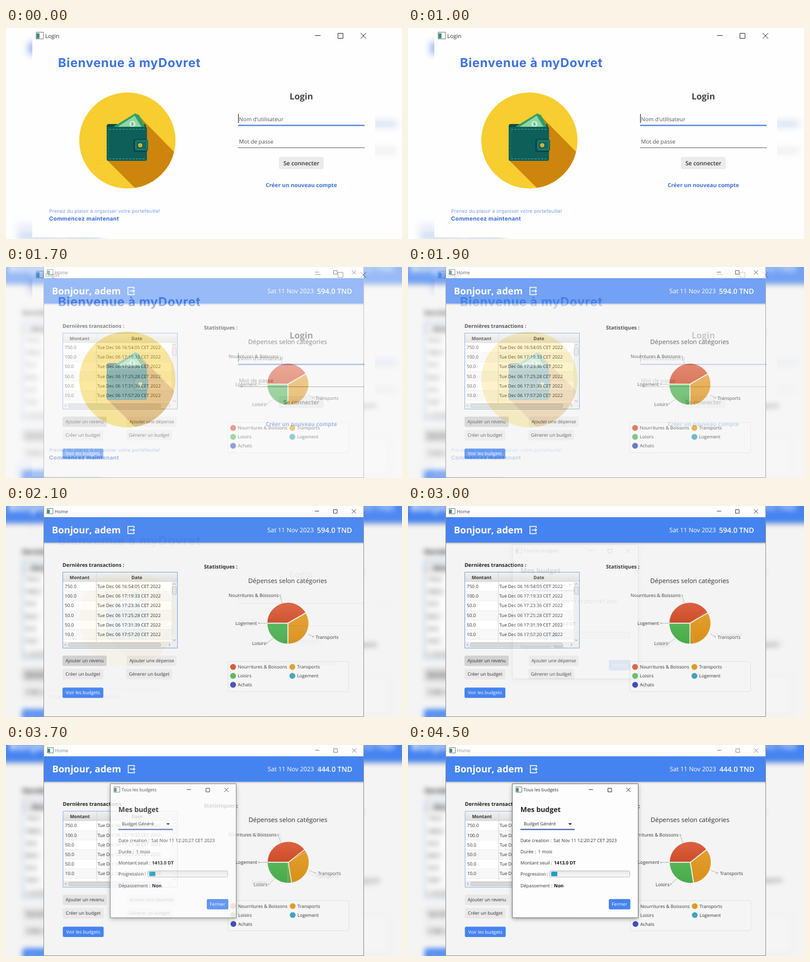
Animation, 708 px wide and 378 px high, one loop 5.2 s. Source, as an HTML page with a canvas:

```html
<!DOCTYPE html>
<html lang="fr">
<head>
<meta charset="utf-8">
<title>Portefeuille</title>
<style>
html, body { margin: 0; width: 100%; height: 100%; overflow: hidden; background: #fff; }
canvas { display: block; width: 708px; height: 378px; }
</style>
</head>
<body>
<canvas id="stage" width="708" height="378"></canvas>
<script>
const W = 708, H = 378, LOOP = 5200, STEP = 100;
const UI = '"Open Sans", "Noto Sans", sans-serif';
const DISPLAY = 'Inter, "Open Sans", sans-serif';
const BLUE = '#4583f0', PAGE = '#f4f4f4', INK = '#333';
const stage = document.getElementById('stage').getContext('2d');
let c;

function layer(paint) {
  const canvas = document.createElement('canvas');
  canvas.width = W;
  canvas.height = H;
  c = canvas.getContext('2d');
  c.textRendering = 'geometricPrecision';
  paint();
  return canvas;
}

// y is the middle of the capitals
function text(s, x, y, size, { color = INK, weight = 400, align = 'left', font = UI, spacing = 0 } = {}) {
  c.font = `${weight} ${size}px ${font}`;
  c.letterSpacing = spacing + 'px';
  c.textAlign = align;
  c.fillStyle = color;
  c.fillText(s, x, y + size * 0.36);
}

function box(x, y, w, h, fill, radius = 0, border) {
  c.beginPath();
  c.roundRect(x, y, w, h, radius);
  if (fill) { c.fillStyle = fill; c.fill(); }
  if (border) { c.strokeStyle = border; c.lineWidth = 1; c.stroke(); }
}

function disc(x, y, r, fill) {
  c.beginPath();
  c.arc(x, y, r, 0, Math.PI * 2);
  c.fillStyle = fill;
  c.fill();
}

function path(points, { fill, stroke, width = 1, dash = [] }) {
  c.beginPath();
  points.forEach(([x, y]) => c.lineTo(x, y));
  if (fill) { c.fillStyle = fill; c.fill(); }
  if (stroke) {
    c.strokeStyle = stroke;
    c.lineWidth = width;
    c.setLineDash(dash);
    c.stroke();
    c.setLineDash([]);
  }
}

function verticalFade(y0, y1, from, to) {
  const g = c.createLinearGradient(0, y0, 0, y1);
  g.addColorStop(0, from);
  g.addColorStop(1, to);
  return g;
}

function titleBar(title, x, y, size, buttons, s, color = INK) {
  box(x + 0.5, y - s / 2 - 0.5, s + 1, s, '#fff', 0, '#777');
  box(x + 1, y - s / 2 + 1.5, s * 0.45, s - 3, '#3b8a80');
  text(title, x + s + 4.5, y, size, { color });
  const [min, max, close] = buttons, h = s / 2 - 1, ink = { stroke: color };
  path([[min - h, y - 0.5], [min + h, y - 0.5]], ink);
  box(Math.round(max - h) + 0.5, Math.round(y - h) + 0.5, 2 * h - 1, 2 * h - 1, null, 0, color);
  path([[close - h, y - h], [close + h, y + h]], ink);
  path([[close - h, y + h], [close + h, y - h]], ink);
}

function wallet() {
  c.save();
  c.beginPath();
  c.arc(217, 201.5, 86, 0, Math.PI * 2);
  c.clip();
  c.fillStyle = '#f7cd2f';
  c.fillRect(130, 114, 175, 175);
  path([[181, 237], [245, 301], [330, 301], [330, 252], [235, 155]], { fill: '#cd850d' });
  c.restore();

  box(180, 172, 70, 12, '#0a4a48', 4);
  path([[190, 178], [231, 153], [238, 156], [250, 180]], { fill: '#2f9f68' });
  path([[198, 178], [230, 157], [244, 180]], { fill: '#8fd5a3' });
  disc(226, 172, 5.5, '#c9efcf');
  text('$', 226, 172, 8, { color: '#2f9f68', weight: 700, align: 'center' });
  box(180, 177, 72, 61, '#0d5f59', 3);
  const stitch = { stroke: '#4ba292', dash: [4, 2] };
  path([[184, 181.5], [249, 181.5]], stitch);
  path([[184, 234.5], [249, 234.5]], stitch);
  path([[183.5, 183], [183.5, 233]], { stroke: '#27776f', dash: [4, 2] });
  box(228, 199, 25, 23, '#083f3f', 4);
  box(230, 200, 24, 20, '#11685f', 3);
  box(232.5, 202.5, 19, 15, null, 2, '#348a7d');
  disc(240, 210, 3.6, '#f2c12e');
  disc(240, 210, 1.5, '#c98a10');
}

function login() {
  c.fillStyle = '#fefefe';
  c.fillRect(0, 0, W, H);
  titleBar('Login', 53.5, 14, 10, [557.5, 597.5, 639], 12);
  text('Bienvenue à myDovret', 93, 62.5, 22, { color: '#3d70e2', weight: 700, font: DISPLAY, spacing: 0.7 });
  wallet();
  text('Prenez du plaisir à organiser votre portefeuille!', 77, 328, 8.7,
    { color: '#7f9be0', font: DISPLAY, spacing: 0.15 });
  text('Commencez maintenant', 77, 341.5, 10, { color: '#3b69d4', weight: 700, font: DISPLAY, spacing: 0.3 });

  text('Login', 528, 122.5, 15.5, { color: '#444', weight: 700, align: 'center' });
  c.fillStyle = '#222';
  c.fillRect(415, 154, 1, 16);
  text("Nom d'utilisateur", 416.5, 163, 9.9, { color: '#555' });
  c.fillStyle = '#3f73d6';
  c.fillRect(415, 173.5, 226, 2);
  text('Mot de passe', 416.5, 203, 9.9, { color: '#555' });
  c.fillStyle = '#666';
  c.fillRect(415, 214, 226, 1);
  box(488, 231, 80, 22, '#ebebeb', 3);
  text('Se connecter', 528, 242, 10.3, { weight: 600, align: 'center' });
  text('Créer un nouveau compte', 528, 281.5, 9.9, { color: '#3d70d8', weight: 700, align: 'center' });
}

function table() {
  const amounts = ['750.0', '100.0', '50.0', '50.0', '50.0', '10.0'];
  const times = ['16:54:05', '17:19:33', '17:23:36', '17:25:28', '17:31:39', '17:57:20'];
  box(101.5, 118.5, 205, 136, '#fff', 0, '#78a2dc');
  box(102, 119, 204, 17, verticalFade(119, 136, '#f1f1f1', '#dcdcdc'));
  text('Montant', 131.5, 128, 8.2, { weight: 700, align: 'center' });
  text('Date', 234, 128, 8.2, { weight: 700, align: 'center' });
  amounts.forEach((amount, i) => {
    const y = 144.2 + i * 17.15;
    box(102, y - 8, 194, 17, i % 2 ? '#f8f8f8' : '#fff');
    path([[102, y + 8.8], [296, y + 8.8]], { stroke: '#ececec' });
    text(amount, 105, y, 8.2);
    text(`Tue Dec 06 ${times[i]} CET 2022`, 163, y, 8.2);
  });
  path([[161.5, 119], [161.5, 243]], { stroke: '#d6d6d6' });
  box(296, 136, 10, 107, '#ededed');
  box(102, 243, 204, 11, '#ededed');
  box(297.5, 144.5, 7, 14, '#e2e2e2', 2, '#bbb');
  box(111.5, 245.5, 165, 6, '#d8d8d8', 2, '#bbb');
  const arrow = { stroke: '#888' };
  path([[298.5, 141], [301, 138.5], [303.5, 141]], arrow);
  path([[298.5, 239], [301, 241.5], [303.5, 239]], arrow);
  path([[107.5, 246], [105, 248.5], [107.5, 251]], arrow);
  path([[291, 246], [293.5, 248.5], [291, 251]], arrow);
}

function pie(cuts, labels) {
  const x = 504, y = 210, r = 37.5, rad = Math.PI / 180;
  const [upper, lower] = cuts;
  const slices = [
    [180, 360 + upper, '#dd6141', '#b93712'],
    [upper, lower, '#e7a234', '#d98f18'],
    [lower, 180, '#62c565', '#48a94b']
  ];
  slices.forEach(([from, to, light, dark]) => {
    c.beginPath();
    c.moveTo(x, y);
    c.arc(x, y, r, from * rad, to * rad);
    c.closePath();
    c.fillStyle = verticalFade(y - r, y + r, light, dark);
    c.fill();
    c.strokeStyle = PAGE;
    c.lineWidth = 1.6;
    c.stroke();
  });
  labels.forEach(([name, tx, ty, x0, y0, x1, y1]) => {
    path([[x0, y0], [x1, y1]], { stroke: '#b5b5b5' });
    disc(x0, y0, 1.6, '#bbb');
    text(name, tx, ty, 8.25);
  });
}

function button(label, x, y, w, fill = '#e9e9e9', color = INK) {
  box(x, y, w, 18.5, fill, 2.5);
  text(label, x + w / 2, y + 9.2, 8.2, { color, align: 'center' });
}

function home({ total, cuts, labels, active }) {
  c.fillStyle = PAGE;
  c.fillRect(-5, 0, W + 10, H);
  c.fillStyle = '#fff';
  c.fillRect(-5, -2, W + 10, 22);
  titleBar('Home', 73, 9.7, 8.4, [556, 588.5, 622], 9.5, active ? INK : '#8c8c8c');
  c.fillStyle = verticalFade(65, 69, '#bbb', PAGE);
  c.fillRect(-5, 65, W + 10, 4);
  c.fillStyle = BLUE;
  c.fillRect(-5, 20, W + 10, 45.5);
  text('Bonjour, adem', 82, 43, 16.8, { color: '#fff', weight: 700 });
  const white = { stroke: '#fff', width: 1.5 };
  path([[229, 39.5], [229, 36.5], [218, 36.5], [218, 49.5], [229, 49.5], [229, 46.5]], white);
  path([[221, 43], [229.5, 43]], white);
  path([[227, 40.5], [229.7, 43], [227, 45.5]], white);
  text('Sat 11 Nov 2023', 467.3, 43, 11.05, { color: '#fff' });
  text(total + ' TND', 556, 43, 12.8, { color: '#fff', weight: 600 });

  text('Dernières transactions :', 101, 105.5, 9.25, { weight: 700, color: '#222' });
  text('Statistiques :', 354, 109, 9.25, { weight: 700, color: '#222' });
  table();
  button('Ajouter un revenu', 101, 268, 79, active ? '#cfcfcf' : '#e8e8e8');
  button('Ajouter une dépense', 216, 268, 89);
  button('Créer un budget', 101, 292, 73);
  button('Génerer un budget', 215, 292, 82);
  button('Voir les budgets', 101, 325.3, 73, BLUE, '#fff');

  text('Dépenses selon catégories', 503.5, 133.5, 11.35, { align: 'center' });
  pie(cuts, labels);
  box(396.5, 278.5, 216, 54, '#f5f5f5', 3, '#e2e2e2');
  const legend = [
    ['Nourritures & Boissons', '#d9512f'], ['Transports', '#e39a22'],
    ['Loisirs', '#55b957'], ['Logement', '#41a3bd'], ['Achats', '#3f4fb8']
  ];
  legend.forEach(([name, color], i) => {
    const x = 406 + (i % 2) * 106, y = 288.3 + Math.floor(i / 2) * 16;
    disc(x, y, 5.2, color);
    text(name, x + 8.5, y, 8.15);
  });
}

function popup() {
  c.save();
  c.shadowColor = 'rgba(0,0,0,.4)';
  c.shadowBlur = 8;
  c.shadowOffsetY = 2;
  box(187, 69.5, 224, 239.5, '#fdfdfd');
  c.restore();
  box(186.5, 69.5, 225, 240, null, 0, '#777');
  titleBar('Tous les budgets', 192.5, 80.3, 8.05, [327, 360.5, 394], 9.5);
  text('Mes budget', 201, 115.7, 12.4, { weight: 700, color: '#222' });
  text('Budget Généré', 207, 141.3, 8.2);
  path([[286.5, 140], [293, 140], [289.8, 143.5]], { fill: '#333' });
  c.fillStyle = '#4159a5';
  c.fillRect(201, 150.3, 97, 2);
  const rows = [
    ['Date creation :', 'Sat Nov 11 12:20:27 CET 2023', 260],
    ['Durée :', '1 mois', 232.5],
    ['Montant seuil :', '1413.0 DT', 261, 700],
    ['Progression :', '', 0],
    ['Dépassement :', 'Non', 261, 700]
  ];
  rows.forEach(([label, value, x, weight], i) => {
    const y = 171.2 + i * 20.1;
    text(label, 201, y, 8.2);
    text(value, x, y, 8.25, { weight, color: weight ? '#111' : INK });
  });
  box(253.5, 225.5, 143, 11, verticalFade(225, 237, '#e6e6e6', '#fafafa'), 2, '#bdbdbd');
  box(256, 227, 11, 8, '#1c9fc4', 1);
  box(359, 276, 38.5, 18.5, BLUE, 2.5);
  text('Fermer', 378.2, 285.5, 8.2, { color: '#fff', align: 'center' });
}

// A clear window over an enlarged, blurred copy of itself
function framed(scene, x, w, h, blur, border) {
  return layer(() => {
    const k = 1.04 * W / w;
    c.fillStyle = PAGE;
    c.fillRect(0, 0, W, H);
    c.save();
    c.filter = `blur(${blur}px)`;
    c.setTransform(k, 0, 0, k, (1 - k) * W / 2, (1 - k) * H / 2);
    c.drawImage(scene, 0, 0);
    c.restore();
    c.drawImage(scene, x, 0, w, h, x, 0, w, h);
    if (border) box(x + 0.5, -2, w - 1, h + 1.5, null, 0, border);
  });
}

const before = {
  total: '594.0', cuts: [-30, 90], active: true,
  labels: [
    ['Nourritures & Boissons', 398, 160, 490, 160, 494, 174],
    ['Transports', 553.5, 235, 549, 234, 540, 229],
    ['Logement', 410, 210, 452, 210, 467, 210],
    ['Loisirs', 440, 246.5, 466, 245.5, 478, 237]
  ]
};
const after = {
  total: '444.0', cuts: [-38, 81], active: false,
  labels: [
    ['Nourritures & Boissons', 393.5, 161, 486, 161, 491, 175],
    ['Transports', 557, 229.3, 552, 229, 541, 224],
    ['Logement', 410, 210, 452, 210, 467, 210],
    ['Loisirs', 442, 249.5, 469, 249, 480, 239]
  ]
};

const loginView = framed(layer(login), 47, 613, 375, 7);
const homeView = framed(layer(() => home(before)), 67, 573, 378, 5, '#8f8f8f');
const budgetView = framed(layer(() => {
  c.save();
  c.translate(0.7, 0.3);
  home(after);
  c.restore();
  popup();
}), 67, 573, 378, 5, '#8f8f8f');

function show(view, alpha) {
  stage.globalAlpha = Math.min(1, Math.max(0, alpha));
  stage.drawImage(view, 0, 0);
}

function frame() {
  const t = Math.floor(performance.now() % LOOP / STEP) * STEP;
  show(loginView, 1);
  show(homeView, (t - 1150) / 1000);
  show(budgetView, (t - 2880) / 1000);
  requestAnimationFrame(frame);
}
frame();
</script>
</body>
</html>
```
